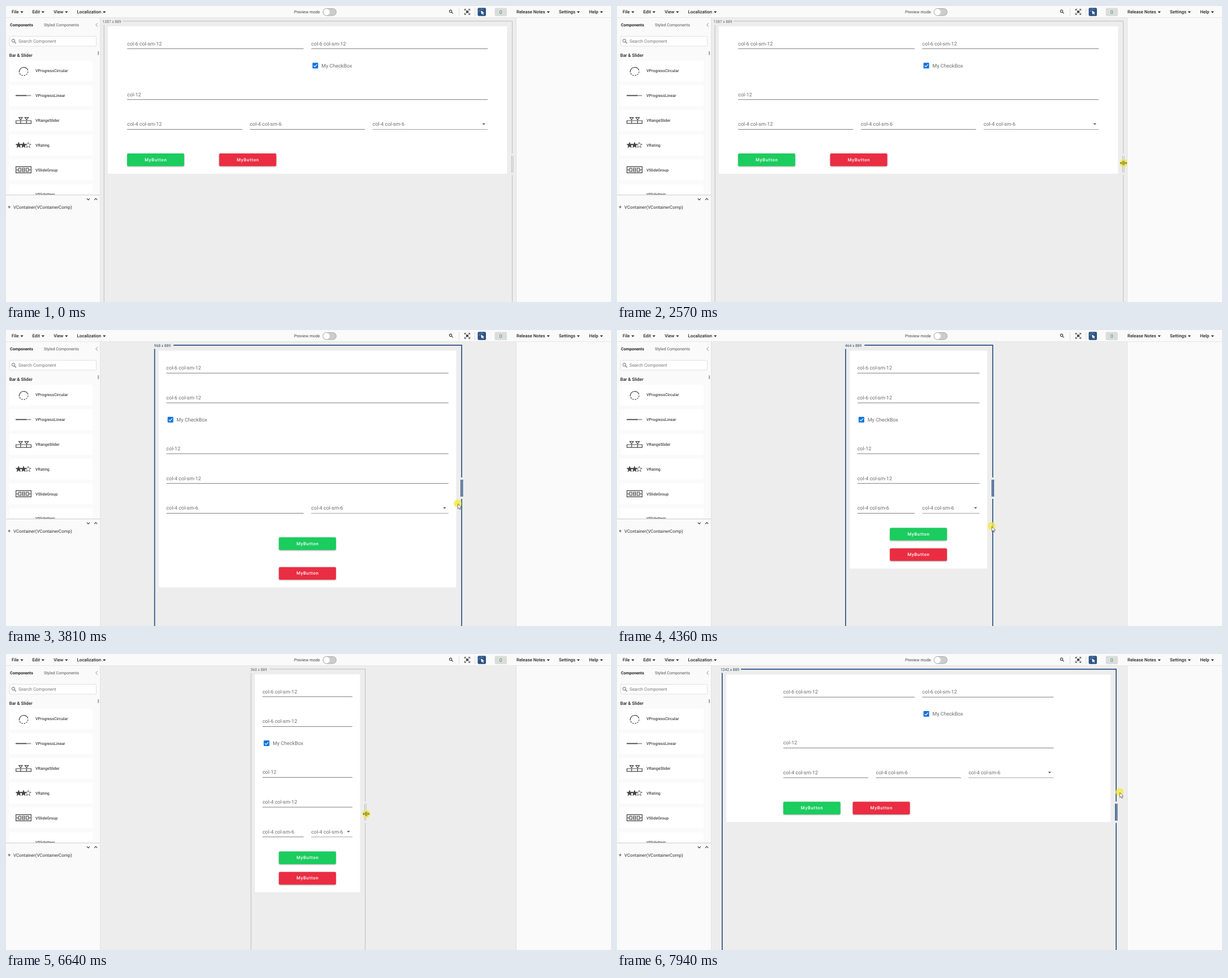
Recreate the animation shown at these times as an HTML page. Size 1069 px wide and 524 px high, loop 8 s.

```html
<!DOCTYPE html>
<html lang="en">
<head>
<meta charset="utf-8">
<title>Responsive form preview</title>
<style>
  html, body { margin: 0; width: 100%; height: 100%; overflow: hidden; background: #ededed; }
  svg { display: block; width: 1069px; height: 524px; font: 400 7.84px Roboto, sans-serif; text-rendering: geometricPrecision; }
  .menu { font-weight: 500; fill: #222; }
  .name { font-size: 7.05px; font-weight: 500; fill: #444; }
  .field { font-size: 8.97px; fill: #6c6c6c; }
  .button { font-weight: 500; letter-spacing: .0893em; fill: #fff; text-anchor: middle; }
  .button + .button, .shadow { filter: drop-shadow(0 1.2px 1px rgba(0, 0, 0, .32)); }
  .icon { fill: none; stroke: #444; stroke-width: 1.2; }
  #frame { fill: none; stroke: #bcbcbc; stroke-width: 1; }
  #size { font-size: 6.72px; fill: #666; text-anchor: middle; }
  .drag #frame { stroke: #2b5384; stroke-width: 1.7; }
  .drag #size { fill: #2d4767; }
</style>
</head>
<body>
<svg id="stage" viewBox="0 0 1069 524">
  <rect width="1069" height="524" fill="#ededed"/>

  <path id="frame"/>
  <text id="size" y="29.6"></text>
  <rect id="page" fill="#fff"/>
  <g id="form">
    <g id="fields"></g>
    <g id="check">
      <rect x="2.2" y="-5" width="10" height="10" rx="1" fill="#0f73dc"/>
      <path d="M4.3 .1L6.4 2.2L10.3 -2" fill="none" stroke="#fff" stroke-width="1.2"/>
      <text class="field" x="18" y="3.2">My CheckBox</text>
    </g>
    <g id="buttons"></g>
  </g>

  <g id="panels">
    <rect y="21" width="167" height="503" fill="#fafafa"/>
    <rect x="901" y="21" width="168" height="503" fill="#fafafa"/>
    <path d="M166.5 21V524M901.5 21V524" stroke="#e2e2e2"/>
    <rect width="1069" height="21" fill="#fafafa"/>
    <path d="M0 20.5H1069" stroke="#e6e6e6"/>
  </g>

  <g id="menus"></g>
  <g id="tools">
    <text x="509" y="13.3" font-size="7.28" fill="#444">Preview mode</text>
    <rect x="560" y="4.5" width="23.5" height="12.5" rx="6.2" fill="#ccc" stroke="#aaa"/>
    <circle cx="566.3" cy="10.7" r="5.6" fill="#fff"/>
    <circle cx="785.6" cy="9.2" r="2.1" class="icon"/>
    <path d="M787.2 10.8L789.7 13.3" class="icon"/>
    <path d="M800.5 4V18M828.5 4V18" stroke="#ddd"/>
    <path d="M810.5 8V5.8H813M817 5.8H819.5V8M819.5 12.5V14.8H817M813 14.8H810.5V12.5M812.5 7.8L817.5 12.8M817.5 7.8L812.5 12.8" class="icon" stroke-width="1"/>
    <circle cx="815" cy="10.3" r="2" fill="#444"/>
    <rect x="833.5" y="3.3" width="14.5" height="14.5" rx="2" fill="#2b5384"/>
    <path d="M839.2 8L840 14.8L841.6 13.2L843.2 15.4L844.2 14.6L842.8 12.5L845 12Z" fill="#fff"/>
    <path d="M837.2 8.8H835.8M838 6.6L837 5.6M840.2 6V4.7M842.3 6.8L843.4 5.7" stroke="#fff" stroke-width=".8"/>
    <rect x="863.5" y="3.5" width="21.5" height="14.5" rx="2" fill="#dcdcdc"/>
    <text x="874.2" y="13.8" font-size="8.9" fill="#22a94f" text-anchor="middle">0</text>
  </g>

  <g id="sidebar">
    <text x="7" y="36" font-size="7.15" font-weight="600" fill="#222">Components</text>
    <text x="67" y="36" font-size="7.15" fill="#555">Styled Components</text>
    <path d="M161.8 30.3L158.8 33.5L161.8 36.7" fill="none" stroke="#777" stroke-width=".9"/>
    <rect x="6" y="53.8" width="153.5" height="17.2" rx="2" fill="#fff" stroke="#ddd" stroke-width=".9"/>
    <circle cx="13" cy="61.4" r="2.7" fill="none" stroke="#666" stroke-width="1"/>
    <path d="M15 63.4L17.8 66.3" stroke="#666" stroke-width="1.1"/>
    <text x="22" y="65.4" fill="#777">Search Component</text>
    <text x="5.7" y="89.7" font-weight="500" fill="#222">Bar &amp; Slider</text>
    <rect x="162" y="80" width="2.2" height="7" rx="1" fill="#aaa"/>
    <g id="cards"></g>
    <g class="icon">
      <path d="M23.4 117.7A8 8 0 0 1 38.9 114"/>
      <path d="M39 116A8 8 0 0 1 23.8 118.6" stroke-dasharray="2.6 1.7"/>
      <path d="M35 158.5H44.5" stroke="#999" stroke-width="1.8"/>
      <path d="M17 158.5H36" stroke-width="1.8"/>
      <path d="M17.6 203H44.4V207.8H17.6ZM25.8 203V207.8M36.4 203V207.8M22.6 197.3H29L25.8 201.5ZM33.2 197.3H39.6L36.4 201.5Z"/>
      <path d="M17.6 284.4H44.4V295.4H17.6ZM22.5 287H26.3V293H22.5ZM29 287H33V293H29ZM35.7 287H39.5V293H35.7ZM20.8 288.6L19.4 290L20.8 291.4M41.2 288.6L42.6 290L41.2 291.4M29.5 290H32.5"/>
    </g>
    <g id="stars"></g>
    <rect y="334" width="166" height="190" fill="#fafafa"/>
    <path d="M0 334.5H166" stroke="#ccc"/>
    <path d="M142.7 340.7L145.3 343.3L147.9 340.7M156 343.3L158.6 340.7L161.2 343.3" class="icon" stroke-width="1.1"/>
    <path d="M3.3 355.8H8M5.6 353.5V358.2" stroke="#444" stroke-width=".9"/>
    <text x="13" y="359.1" fill="#333">VContainer(VContainerComp)</text>
  </g>

  <g id="cursor">
    <circle id="press" r="7" fill="#f3ea3f" opacity=".78"/>
    <path id="arrow" d="M.5 .7V9.7L2.6 7.8L4 11L5.4 10.4L4 7.3H6.6Z" fill="#fff" stroke="#444" stroke-width=".7"/>
    <path id="resize" d="M-1.1 -4V4M1.1 -4V4M-1.1 0H-5.4M1.1 0H5.4M-3.6 -2L-5.6 0L-3.6 2M3.6 -2L5.6 0L3.6 2" fill="none" stroke="#555528" stroke-width=".9"/>
  </g>
</svg>

<script>
const LOOP = 8000, SCALE = .5605, GUTTER = 24 * SCALE;
const PAGE_X = 532.6, FRAME_X = 533.9, BUTTON_W = 100.9, BUTTON_H = 22.4;
const FIRST_LINE = 75.7, ROW = 52.7, CHECK_ROW = 90;
const $ = id => document.getElementById(id);
const fill = (id, items, draw) => { $(id).innerHTML = items.map(draw).join(''); };
const set = (el, attrs) => { for (const k in attrs) el.setAttribute(k, attrs[k]); };
const move = (el, x, y) => el.setAttribute('transform', `translate(${x} ${y})`);
const show = (el, on) => { el.style.display = on ? '' : 'none'; };

fill('menus', [['File', 10, 28], ['Edit', 46.5, 65.3], ['View', 84.3, 106.8], ['Localization', 125.5, 173.7],
  ['Release Notes', 902, 958.2], ['Settings', 977, 1011.3], ['Help', 1030.3, 1052.2]],
  ([label, x, caret]) => `<text class="menu" x="${x}" y="13.4">${label}</text>
    <path d="M${caret - 2.6} 9.6h5.2l-2.6 2.8z" fill="#222"/>`);

fill('cards', ['VProgressCircular', 'VProgressLinear', 'VRangeSlider', 'VRating', 'VSlideGroup', 'VSlideItem'],
  (name, i) => `<g transform="translate(0 ${115 + 43.78 * i})">
    <rect x="6" y="-18.5" width="147" height="37" rx="2" fill="#fff"/>
    <text class="name" x="52" y="2.4">${name}</text></g>`);

const star = (x, y) => Array.from({ length: 10 }, (_, i) => {
  const a = i * Math.PI / 5, r = i % 2 ? 2.2 : 5.2;
  return `${x + r * Math.sin(a)},${y - r * Math.cos(a)}`;
}).join(' ');
fill('stars', [22.3, 31, 39.3], (x, i) =>
  `<polygon points="${star(x, 246.4)}" fill="${i < 2 ? '#444' : '#fff'}" stroke="#444" stroke-width=".8"/>`);

fill('fields', ['col-6 col-sm-12', 'col-6 col-sm-12', 'col-12', 'col-4 col-sm-12', 'col-4 col-sm-6', 'col-4 col-sm-6'],
  (label, i) => `<g><rect y="-.45" height=".9" fill="${i < 5 ? '#707070' : '#999'}"/>
    <text class="field" y="-6.2">${label}</text>
    ${i < 5 ? '' : '<path d="M-2.8 -10.6h5.6l-2.8 2.8z" fill="#555"/>'}</g>`);

fill('buttons', ['#1bcc5f', '#ea2d42'], color => `<g>
  <rect class="shadow" width="${BUTTON_W}" height="${BUTTON_H}" rx="2" fill="${color}"/>
  <text class="button" x="${BUTTON_W / 2 + .3}" y="13.6">MyButton</text></g>`);

// Smooth monotone curve through [time, value] keys.
function track(keys) {
  const rate = i => (keys[i + 1][1] - keys[i][1]) / (keys[i + 1][0] - keys[i][0]);
  const slope = keys.map((_, i) => {
    if (!i || i === keys.length - 1) return 0;
    const a = rate(i - 1), b = rate(i);
    return a * b > 0 ? 2 * a * b / (a + b) : 0;
  });
  return t => {
    if (t <= keys[0][0]) return keys[0][1];
    const i = keys.findIndex(k => k[0] > t) - 1;
    if (i < 0) return keys[keys.length - 1][1];
    const [t0, v0] = keys[i], [t1, v1] = keys[i + 1];
    const d = t1 - t0, u = (t - t0) / d, w = 1 - u;
    return v0 * w * w * (1 + 2 * u) + v1 * u * u * (3 - 2 * u) + d * u * w * (slope[i] * w - slope[i + 1] * u);
  };
}

const widthAt = track([[2650, 1287], [3330, 1140], [3810, 968], [4150, 694], [4356, 464], [4700, 360],
  [6780, 360], [7350, 1002], [7610, 1133], [7935, 1242], [8040, 1266]]);
const path = [[460, 1036, 498], [1230, 906, 297], [1510, 893, 278], [2040, 893, 278], [2110, 895, 278],
  [2650, 895, 278], [3330, 847, 294], [3810, 798, 307], [4150, 721, 331], [4356, 662, 347], [4700, 633, 357],
  [5640, 633, 357], [6050, 646, 320], [6440, 636.5, 283], [6780, 636.5, 283], [7350, 823, 247],
  [7610, 858, 245.5], [7935, 888, 244.5], [8040, 894, 244.3]];
const cursorX = track(path.map(([t, x]) => [t, x]));
const cursorY = track(path.map(([t, , y]) => [t, y]));

function tick(t) {
  const [anchor, step] = t < 5600 ? [3810, 68.3] : [7350, 65];
  return anchor + Math.floor((t - anchor + 8) / step) * step;
}

function layout(width, drag) {
  const half = width * SCALE / 2, pageHalf = half - (drag ? 8.6 : 8);
  const left = FRAME_X - half, right = FRAME_X + half;
  const wide = width >= 976, narrow = width < 616;
  const boxHalf = width >= 1280 ? 1185 * SCALE / 2 : wide ? 900 * SCALE / 2 : pageHalf;
  const fieldHalf = boxHalf - GUTTER, start = PAGE_X - fieldHalf;
  const unit = (2 * fieldHalf + GUTTER) / 12;

  set($('frame'), { d: `M${left} 33.5V525M${left + 33.3} 26.8H${right}V261M${right} 299V525` +
    `M${right - 1.1} 265V295M${right + 1.4} 265V295` });
  $('size').textContent = `${Math.round(width)} x 889`;
  $('size').setAttribute('x', left + 13.7);

  const second = wide ? FIRST_LINE : FIRST_LINE + ROW;
  const third = second + CHECK_ROW, fourth = third + ROW, last = wide ? fourth : fourth + ROW;
  const cells = wide
    ? [[0, 6, FIRST_LINE], [6, 6, second], [0, 12, third], [0, 4, fourth], [4, 4, last], [8, 4, last]]
    : [[0, 12, FIRST_LINE], [0, 12, second], [0, 12, third], [0, 12, fourth], [0, 6, last], [6, 6, last]];
  cells.forEach(([col, span, y], i) => {
    const field = $('fields').children[i], w = span * unit - GUTTER;
    move(field, start + col * unit, y);
    set(field.children[0], { width: w });
    if (field.children[2]) move(field.children[2], w - 7, 0);
  });
  move($('check'), start + cells[1][0] * unit, second + 29.7);

  const [first, next] = $('buttons').children;
  const top = last + (narrow ? 25.8 : 42.6);
  const nextTop = wide ? top : top + (narrow ? 36.2 : ROW);
  const x = wide ? start : PAGE_X - BUTTON_W / 2;
  move(first, x, top);
  move(next, wide ? x + 3 * unit : x, nextTop);

  const shift = drag ? .6 : 0;
  move($('form'), 0, shift);
  set($('page'), { x: PAGE_X - pageHalf, y: 36 + shift, width: 2 * pageHalf, height: nextTop + BUTTON_H + 13.5 - 36 });
}

function render(t) {
  const now = tick(t), drag = t >= 2700 && t < 4900 || t >= 6840;
  const resize = t >= 1430 && t < 2700 || t >= 6300 && t < 6840;
  $('stage').classList.toggle('drag', drag);
  layout(widthAt(now), drag);
  move($('cursor'), cursorX(now), cursorY(now));
  show($('cursor'), t >= 460);
  show($('press'), t >= 2570 && t < 5500 || t >= 6640);
  show($('arrow'), !resize);
  show($('resize'), resize);
}

const began = performance.now();
function loop() {
  render((performance.now() - began) % LOOP);
  requestAnimationFrame(loop);
}
loop();
</script>
</body>
</html>
```
